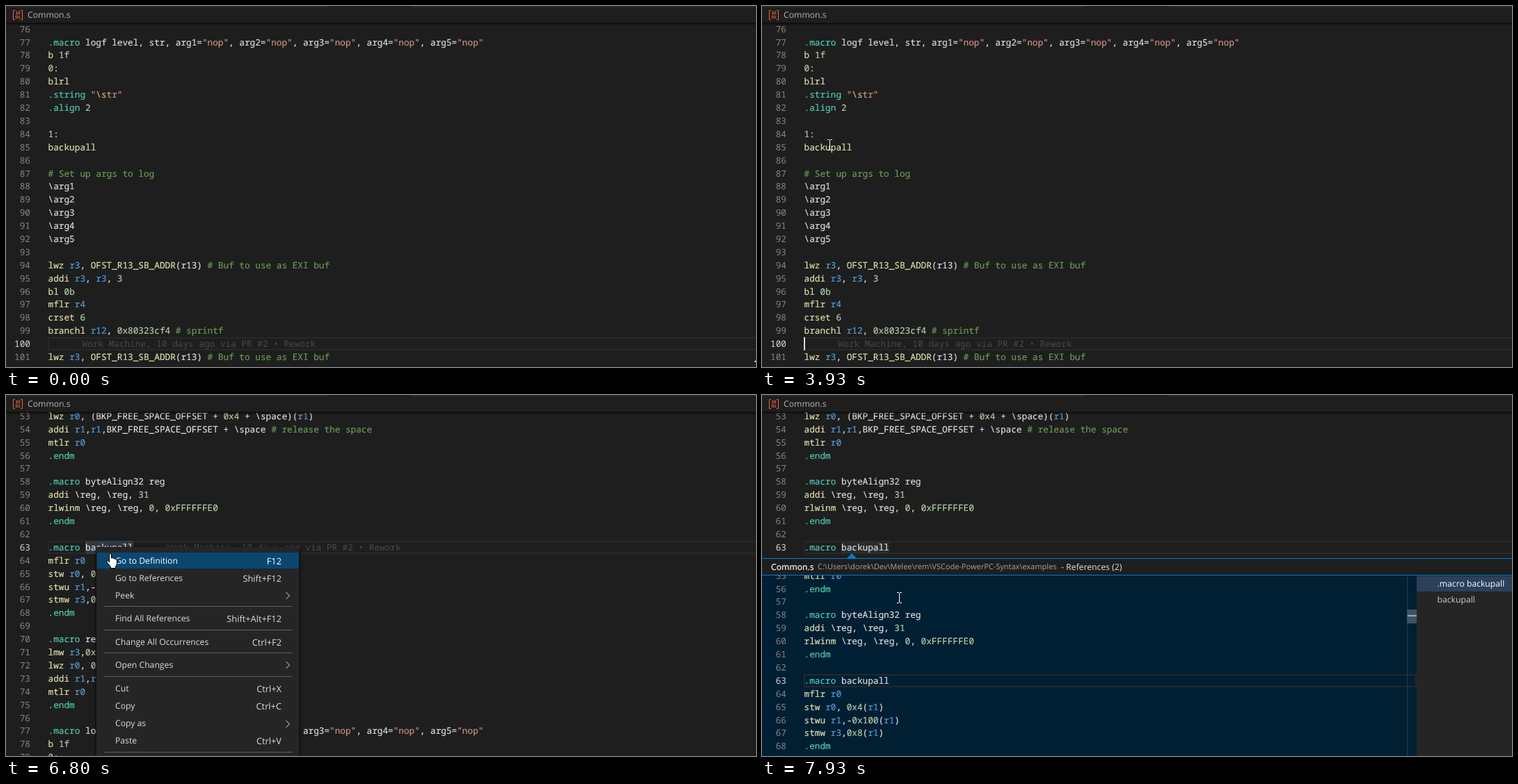
Write an HTML page that moves like this. It is 1078 by 520 pixels and loops after 8000 ms.

```html
<!DOCTYPE html>
<html lang="en">
<head>
<meta charset="utf-8">
<title>Common.s</title>
<style>
html, body { margin: 0; width: 100%; height: 100%; overflow: hidden; background: #1e1e1e; }
#stage { position: relative; width: 1078px; height: 520px; overflow: hidden; background: #1e1e1e;
  text-rendering: geometricPrecision; cursor: none; }
#stage div, #stage svg { position: absolute; }
.ed { left: 0; overflow: hidden; }
.row, .blame { height: 19px; white-space: pre; color: #dcdcdc; font: 12.73px/19px "Noto Sans Mono", monospace; }
.row { left: 60.6px; -webkit-text-stroke-width: .2px; }
.num { top: 0; right: calc(100% + 25.6px); color: #858585; -webkit-text-stroke-width: 0; }
.row:empty { width: 0; }
.on .num { color: #d8d8d8; }
.dir { color: #4ec9b0; } .fn { color: #dcdcaa; } .reg { color: #569cd6; } .n { color: #b5cea8; }
.str { color: #ce9178; } .esc { color: #d7ba7d; } .com { color: #6a9955; }
.blame { color: #494949; }
.line { left: 60px; height: 15px; border: 2px solid #282828; border-right: 0; }
.caret { width: 2px; height: 19px; background: #d8d8d8; }
.mark { height: 19px; }
.ui { font: 12.2px/20px "Open Sans", sans-serif; color: #ccc; white-space: pre; }
.key { font-size: 12.8px; }
.sep { left: 11px; width: 270px; height: 1px; background: #606060; }
#menu { left: 130px; top: 219px; width: 291px; height: 310px; background: #252526; box-shadow: 0 2px 5px #000; }
#pick { left: 1px; width: 290px; height: 23px; background: #094771; }
#tip { left: 61px; top: 254px; width: 512px; height: 108px; background: #252526; border: 1px solid #454545; }
#tip .row { left: 8px; }
</style>
</head>
<body>
<div id="stage"></div>
<script>
const FIRST = 53, ROW = 18.9, CHAR = 7.64, LEFT = 60.6, TICK = 8000 / 120;
const BLAME = 'Work Machine, 10 days ago via PR #2 • Rework';
const source = String.raw`lwz r0, (BKP_FREE_SPACE_OFFSET + 0x4 + \space)(r1)
addi r1,r1,BKP_FREE_SPACE_OFFSET + \space # release the space
mtlr r0
.endm

.macro byteAlign32 reg
addi \reg, \reg, 31
rlwinm \reg, \reg, 0, 0xFFFFFFE0
.endm

.macro backupall
mflr r0
stw r0, 0x4(r1)
stwu r1,-0x100(r1)
stmw r3,0x8(r1)
.endm

.macro restoreall
lmw r3,0x8(r1)
lwz r0, 0x104(r1)
addi r1,r1,0x100
mtlr r0
.endm

.macro logf level, str, arg1="nop", arg2="nop", arg3="nop", arg4="nop", arg5="nop"
b 1f
0:
blrl
.string "\str"
.align 2

1:
backupall

# Set up args to log
\arg1
\arg2
\arg3
\arg4
\arg5

lwz r3, OFST_R13_SB_ADDR(r13) # Buf to use as EXI buf
addi r3, r3, 3
bl 0b
mflr r4
crset 6
branchl r12, 0x80323cf4 # sprintf

lwz r3, OFST_R13_SB_ADDR(r13) # Buf to use as EXI buf`.split('\n');

const stage = document.getElementById('stage');

function add(parent, cls, css = {}, text = '') {
  const el = document.createElement('div');
  el.className = cls;
  el.textContent = text;
  for (const k in css) el.style[k] = typeof css[k] === 'number' ? css[k] + 'px' : css[k];
  parent.append(el);
  return el;
}
const box = (parent, left, top, width, height, background) =>
  add(parent, '', { left, top, width, height, background });
const label = (parent, left, mid, text, css = {}) =>
  add(parent, 'ui', { left, top: mid - 10.5, ...css }, text);
const show = (el, yes) => { el.style.display = yes ? '' : 'none'; };

// Syntax colouring
const token = /(#.*$)|("[^"]*")|(^\.\w+)|(^[a-z]\w*|OFST_\w+)|\b(r(?:\d|1[0-2]))\b|\b(0x[\da-fA-F]+|\d+[bf]?)\b/g;
const kinds = ['com', 'str', 'dir', 'fn', 'reg', 'n'];
function colour(text) {
  return text.replace(token, (m, ...g) => {
    const kind = kinds[g.findIndex(Boolean)];
    const body = kind === 'str' ? m.replace(/\\\w/, '<span class="esc">$&</span>') : m;
    return `<span class="${kind}">${body}</span>`;
  });
}

function editor(parent, top, width, height, background) {
  const root = add(parent, 'ed', { top, width, height, background });
  const back = add(root, '', { left: 0, top: 0 });
  const rows = source.map((text, i) => {
    const row = add(root, 'row');
    row.innerHTML = colour(text);
    add(row, 'num', {}, String(FIRST + i));
    return row;
  });
  let base = 0;
  const mid = n => base + (n - 63) * ROW - top;
  const put = (el, n) => { el.style.top = Math.round(mid(n) - 9.5) + 'px'; };
  return {
    root, back, put,
    scroll(y) {
      if (y === base) return;
      base = y;
      rows.forEach((row, i) => put(row, FIRST + i));
    },
    activate(n) { rows.forEach((row, i) => row.classList.toggle('on', FIRST + i === n)); }
  };
}

// Main editor
const main = editor(stage, 24, 1078, 496, '#1e1e1e');
const line = add(main.back, 'line', { width: 1018 });
const mark = add(main.back, 'mark');
const blame = add(main.root, 'blame', {}, BLAME);
const caret = add(main.root, 'caret');
box(stage, 0, 24, 1078, 5, 'linear-gradient(#0009, #0000)');

// Breadcrumb
box(stage, 0, 0, 1078, 24, '#1e1e1e');
box(stage, 0, 0, 463, 2, '#272728');
box(stage, 584, 0, 494, 2, '#272728');
label(stage, 31, 13.5, 'Common.s', { color: '#b4b4b4' });
stage.insertAdjacentHTML('beforeend', `<svg style="left:9px;top:5px" width="16" height="16" fill="#e8663c">
  <path d="M4 1.5H1.5V14.5H4M12 1.5H14.5V14.5H12" fill="none" stroke="#e8663c"/>
  <g font-family="Liberation Sans, sans-serif" font-weight="bold" font-size="6.5" text-anchor="middle">
  <text x="8" y="7.2">10</text><text x="8" y="13.4">01</text></g></svg>`);

// Hover card
const tip = add(stage, '', {});
tip.id = 'tip';
add(tip, 'row', { top: 4 }).innerHTML = colour('lwz rD, d(rA)');
box(tip, 0, 27, 512, 1, '#454545');
['Load Word and Zero',
 'The effective address is the sum (rA|0) + d. The word in memory addressed',
 'by it is loaded into rD.'].forEach((s, i) => label(tip, 8, 43 + i * 21, s));

// Context menu
const menu = add(stage, '');
menu.id = 'menu';
const pick = add(menu, '');
pick.id = 'pick';
const items = [
  [239, 'Go to Definition', 'F12'], [264, 'Go to References', 'Shift+F12'], [289, 'Peek', '>'],
  [322.5, 'Find All References', 'Shift+Alt+F12'], [356, 'Change All Occurrences', 'Ctrl+F2'],
  [389, 'Open Changes', '>'], [423, 'Cut', 'Ctrl+X'], [448, 'Copy', 'Ctrl+C'],
  [473.5, 'Copy as', '>'], [498, 'Paste', 'Ctrl+V']
].map(([y, name, key]) => {
  const parts = [label(menu, 27, y - 219, name)];
  if (key === '>') {
    menu.insertAdjacentHTML('beforeend', `<svg style="left:271px;top:${y - 225}px" width="9" height="12">
      <path d="M1.5 1L6.5 6L1.5 11" fill="none" stroke="#ddd"/></svg>`);
  } else {
    const k = label(menu, 'auto', y - 219, key, { right: 25 });
    k.classList.add('key');
    parts.push(k);
  }
  return parts;
});
[304, 338, 371, 405, 514].forEach(y => add(menu, 'sep', { top: y - 219 }));

// Reference peek
const peek = add(stage, '', { left: 0, top: 0, width: 1078, height: 520 });
box(peek, 0, 229, 1078, 291, '#1e1e1e');
box(peek, 122, 228, 14, 7, '#007acc').style.clipPath = 'polygon(50% 0, 100% 100%, 0 100%)';
label(peek, 13, 248, 'Common.s', { color: '#fff', webkitTextStroke: '.2px #fff' });
label(peek, 80, 248, 'C:\\Users\\dorek\\Dev\\Melee\\rem\\VSCode-PowerPC-Syntax\\examples',
  { color: '#a4a4a4', fontSize: 11 });
label(peek, 430, 248, '- References (2)', { color: '#e4e4e4' });
const inner = editor(peek, 260, 941, 260, '#001f33');
inner.scroll(411.3);
inner.activate(63);
inner.put(add(inner.back, 'line', { width: 877, borderRight: '2px solid #282828' }), 63);
box(inner.root, 927, 0, 1, 260, '#26394a');
box(inner.root, 927, 49, 14, 20, '#3c5365');
box(inner.root, 928, 57, 13, 2, '#a0a8ae');
const list = box(peek, 941, 260, 137, 260, '#252526');
box(list, 0, 1, 137, 22, '#2a405c');
label(list, 29.5, 12, '.macro backupall', { color: '#fff' });
label(list, 29.5, 35, 'backupall');
box(peek, 0, 235, 1078, 1, '#007acc');
box(peek, 0, 259, 1078, 1, '#007acc');

// Mouse shapes, each drawn around its hot spot
function pointer(dx, dy, d, style) {
  stage.insertAdjacentHTML('beforeend',
    `<svg width="20" height="24" style="margin:${-dy}px 0 0 ${-dx}px"><path d="${d}" ${style}/></svg>`);
  return stage.lastElementChild;
}
const solid = 'fill="#fff" stroke="#000" stroke-width="1"';
const shapes = {
  beam: pointer(4, 8, 'M1 .5H3.5L4.5 1.5L5.5 .5H8M4.5 1V15M1 15.5H3.5L4.5 14.5L5.5 15.5H8', 'fill="none" stroke="#fff"'),
  arrow: pointer(0, 0, 'M.5 .5V16.5L4.2 13L6.6 18.5L9 17.5L6.6 12H11.5Z', solid),
  hand: pointer(6, 0, 'M4.5 13V2Q4.5 .5 6 .5T7.5 2V7Q10 5.8 10.3 7.6Q12.4 6.6 12.8 8.5Q15.5 8 15.5 10.5V15Q15.5 17 13.5 19V21.5H6.5V19.5L1.2 13Q.3 11 2.2 10.6Q3.5 11 4.5 13Z', solid)
};
const speck = box(stage, 1076, 511, 2, 2, '#ddd');

// tick, x, y
const path = [
  [1, 1084, 505], [5, 760, 402], [9, 330, 300], [12, 190, 318], [14, 151, 364], [17, 118, 378],
  [20, 87, 375], [21, 87, 375], [24, 75, 375], [41, 75, 375], [45, 84, 300], [49, 97, 200],
  [63, 97, 200], [67, 110, 234], [69, 118, 219], [83, 118, 219], [86, 133, 219], [96, 133, 219],
  [97, 131, 218], [100, 131, 218], [102, 150, 228], [105, 168, 250], [107, 178, 259],
  [110, 178, 259], [112, 180, 267], [116, 180, 267], [119, 197, 292]
];
function mouseAt(k) {
  const i = path.findIndex(p => p[0] >= k);
  if (i < 1) return path[0].slice(1);
  const [a, ax, ay] = path[i - 1], [b, bx, by] = path[i];
  const f = (k - a) / (b - a);
  return [Math.round(ax + (bx - ax) * f), Math.round(ay + (by - ay) * f)];
}

// Last entry whose tick has been reached
const at = (steps, k) => steps.filter(s => s[0] <= k).pop().slice(1);
const carets = [[0], [59, 100, 0], [60, 85, 4], [73, 63, 1], [80], [88, 63, 9], [95], [110, 63, 9], [111]];
const blames = [[0, 100, 0], [60], [64, 85, 9], [73], [77, 63, 16], [111]];
const lines = [[0, 100], [60, 85], [73, 63]];
const marks = [[0], [29, 94, 0, 3, '#202a34'], [47], [91, 63, 7, 9, '#2c3137'],
  [95, 63, 7, 9, '#313a43'], [111, 63, 7, 9, '#2a2b2d']];

function render(k) {
  main.scroll(k < 73 ? 52 - 14 * ROW : 219.3);
  const [cur] = at(lines, k);
  main.activate(cur);
  main.put(line, cur);

  const [cl, cc] = at(carets, k);
  show(caret, cl);
  if (cl) { main.put(caret, cl); caret.style.left = Math.round(60 + cc * 7.62) + 'px'; }

  const [bl, bc] = at(blames, k);
  show(blame, bl);
  if (bl) { main.put(blame, bl); blame.style.left = LEFT + bc * CHAR + 48.9 + 'px'; }

  const [ml, mc, mw, bg] = at(marks, k);
  show(mark, ml);
  if (ml) {
    main.put(mark, ml);
    Object.assign(mark.style, { left: LEFT + mc * CHAR + 'px', width: mw * CHAR + 'px', background: bg });
  }

  show(tip, k >= 29 && k < 47);
  tip.style.opacity = Math.min(1, (k - 28) / 3);

  const [x, y] = mouseAt(k);
  show(menu, k >= 97 && k < 110);
  const chosen = k < 101 ? -1 : y < 251 ? 0 : 1;
  show(pick, chosen >= 0);
  pick.style.top = (chosen ? 33 : 8) + 'px';
  items.forEach((parts, i) => parts.forEach(p => { p.style.color = i === chosen ? '#fff' : '#dcdcdc'; }));

  show(peek, k >= 111);
  show(inner.root, k >= 112);
  show(list, k >= 113);

  const shape = k < 97 || k >= 110 ? 'beam' : k < 101 ? 'arrow' : 'hand';
  for (const name in shapes) {
    show(shapes[name], name === shape);
    shapes[name].style.left = x + 'px';
    shapes[name].style.top = y + 'px';
  }
  show(speck, k < 2);
}

let last = -1;
const start = performance.now();
function frame(now) {
  const k = Math.floor((Math.max(0, now - start) % 8000 + 4) / TICK) % 120;
  if (k !== last) render(last = k);
  requestAnimationFrame(frame);
}
render(0);
requestAnimationFrame(frame);
</script>
</body>
</html>
```
